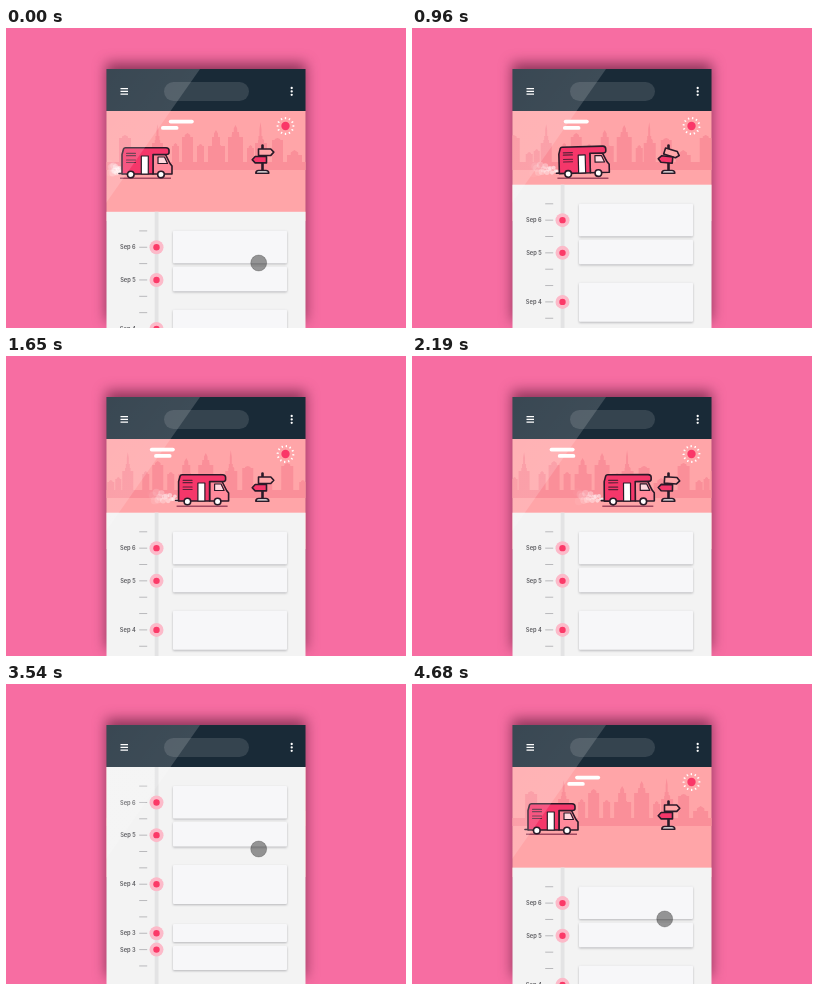
An HTML page that plays this animation: 400 by 300 pixels, repeating every 4.71 s.

```html
<!DOCTYPE html>
<html lang="en">
<head>
<meta charset="utf-8">
<title>Pull to refresh</title>
<style>
  html, body { margin: 0; width: 100%; height: 100%; overflow: hidden; background: #f76da2; }
  svg { display: block; width: 400px; height: 300px; }
  .shade { fill: #50142f; fill-opacity: .62; filter: blur(6.5px); }
  .card { fill: #f7f7f9; filter: drop-shadow(0 1px .9px rgba(40, 40, 50, .3)); }
  .label { font: 600 5.7px Inter, Roboto, sans-serif; fill: #5c5c60; text-anchor: end; }
  .line { stroke: #2a1a28; stroke-width: 1.6; stroke-linejoin: round; stroke-linecap: round; }
  .thin { stroke-width: 1.2; }
  .thick { stroke-width: 2.6; }
</style>
</head>
<body>
<svg viewBox="0 0 400 300">
  <defs>
    <clipPath id="screen"><rect x="100.5" y="41" width="199" height="259"/></clipPath>
    <linearGradient id="sheen" gradientUnits="userSpaceOnUse" x1="100" y1="41" x2="163" y2="85">
      <stop offset="0" stop-color="#fff" stop-opacity=".14"/>
      <stop offset="1" stop-color="#fff" stop-opacity=".16"/>
    </linearGradient>
  </defs>
  <rect width="400" height="300" fill="#f76da2"/>
  <rect class="shade" x="100" y="35" width="200" height="258"/>

  <g clip-path="url(#screen)">
    <rect x="100" y="83" width="200" height="110" fill="#ffa5a8"/>
    <path id="city" fill="#fa8f99"/>
    <g fill="#fff">
      <rect id="cloudA" y="91.7" width="25" height="3.8" rx="1.9"/>
      <rect id="cloudB" y="98" width="17.5" height="3.8" rx="1.9"/>
    </g>
    <circle cx="279.5" cy="98" r="4.2" fill="#fa3768"/>
    <g id="rays" fill="#fff"/>

    <path class="line thick" d="M256.5 117.5V143"/>
    <path class="line" d="M249.8 145.3q0-2.8 2.8-2.8h7.4q2.8 0 2.8 2.8z" fill="#fff"/>
    <path id="signA" class="line" d="M252.5 121h12.3l3 3.2-3 3.2h-12.3z" fill="#ffa7a9"/>
    <path id="signB" class="line" d="M260.5 128.5h-11.3l-3 3.2 3 3.2h11.3z" fill="#f5376a"/>

    <g id="smoke" fill="#fff"/>
    <path id="ground" d="M1 150.2H52" stroke="#a04860" stroke-width="1.5"/>
    <g id="van">
      <path d="M0 27H4" class="line"/>
      <path class="line" d="M34 8H46.500L51 17L53 19.500V27.500H34Z" fill="#ff8a9b"/>
      <path class="line" d="M3 27.500V8L4.500 2.500Q5 1.200 6.500 1.200H47Q50 1.200 50 4V6Q50 8 47.500 8H34V27.500Z" fill="#f5376a"/>
      <path class="line thin" d="M39 10.500H45.500L48.500 17H39Z" fill="#ffd9df"/>
      <path class="line thin" d="M7.500 6.800h9M7.500 9.200h9M7.500 13.500h9M7.500 16h9" stroke-opacity=".75"/>
      <rect class="line thin" x="22.300" y="9.500" width="7" height="18" fill="#fff"/>
      <g class="line" fill="#fff">
        <circle cx="11.800" cy="28" r="3.300"/>
        <circle cx="42" cy="28" r="3.300"/>
      </g>
    </g>

    <g id="sheet">
      <rect x="100" y="83" width="200" height="260" fill="#f3f3f3"/>
      <rect x="148.700" y="83" width="3.800" height="260" fill="#e3e3e4"/>
    </g>
    <g id="cards"/>

    <rect x="100" y="41" width="200" height="42" fill="#192a37"/>
    <path d="M100 41H194L100 175Z" fill="url(#sheen)"/>
    <rect x="158" y="54" width="85" height="19" rx="9.500" fill="#fff" fill-opacity=".12"/>
    <path d="M114.500 60.600h7.500M114.500 63.400h7.500M114.500 66.200h7.500" stroke="#fff" stroke-width="1.200"/>
    <g fill="#fff">
      <circle cx="285.700" cy="60" r="1.150"/>
      <circle cx="285.700" cy="63.400" r="1.150"/>
      <circle cx="285.700" cy="66.800" r="1.150"/>
    </g>
  </g>
  <circle id="finger" cx="252.700" r="8" fill="#000" fill-opacity=".4" stroke="#000" stroke-opacity=".25" stroke-width=".8"/>
</svg>

<script>
const LOOP = 4710, PULLED = 100.8, OPEN = 73.7, PITCH = 16.35;
const $ = id => document.getElementById(id);
const set = (el, attrs) => { for (const k in attrs) el.setAttribute(k, attrs[k]); return el; };
const add = (parent, tag, attrs) =>
  parent.appendChild(set(document.createElementNS('http://www.w3.org/2000/svg', tag), attrs));

const clamp = u => Math.min(1, Math.max(0, u));
const smooth = u => u * u * (3 - 2 * u);
const cubic = u => u < .5 ? 4 * u ** 3 : 1 - 4 * (1 - u) ** 3;

// Skyline: blocks of [x, width, top, roof height], tiled sideways
const blocks = [
  [113, 12, 110, 3], [131, 7, 126, 2], [139, 6, 123, 2],
  [146, 11, 115, 6], [149.5, 4, 108, 12], [166, 7, 118, 3], [176, 11, 109, 4],
  [191, 7, 118, 2], [202, 17, 118, 2], [206, 8, 109, 7], [222, 15, 109, 5],
  [226, 7, 104, 7], [241, 7, 120, 3], [249, 12, 115, 6], [252.5, 4, 108, 14],
  [266, 11, 112, 2], [281, 15, 127, 5]
];
let skyline = 'M60 142V134H560V142Z';
for (const shift of [0, 192]) {
  for (const [x, w, top, roof] of blocks) {
    const q = w / 4, r = roof / 2;
    skyline += `M${x + shift} 142V${top}h${q}v${-r}l${q} ${-r}l${q} ${r}v${r}h${q}V142Z`;
  }
}
set($('city'), { d: skyline });

for (let i = 0; i < 12; i++) {
  add($('rays'), 'rect', {
    x: 278.8, y: 89, width: 1.4, height: 2.2, rx: .6, transform: `rotate(${i * 30} 279.5 98)`
  });
}

const days = { 1: 'Sep 6', 3: 'Sep 5', 6: 'Sep 4', 9: 'Sep 3', 10: 'Sep 3' };
for (let i = 0; i < 12; i++) {
  const y = 102.1 + i * PITCH;
  add($('sheet'), 'rect', { x: 133.2, y: y - .5, width: 8, height: 1, fill: '#b9b9bc' });
  if (!days[i]) continue;
  add($('sheet'), 'circle', { cx: 150.5, cy: y, r: 7, fill: '#fcbac9' });
  add($('sheet'), 'circle', { cx: 150.5, cy: y, r: 3.2, fill: '#fb3a68' });
  add($('sheet'), 'text', { x: 129.7, y: y + 2.1, class: 'label' }).textContent = days[i];
}

const cards = [[102, 32.5], [138, 24.5], [181, 39], [240, 18], [262, 24]].map(([y, height]) =>
  add($('cards'), 'rect', { x: 167, y, width: 114, height, rx: 1, class: 'card' }));
const puffs = Array.from({ length: 16 }, () => add($('smoke'), 'circle', {}));

// Pull progress: a larger lag starts later, all end together
const pull = (t, lag) => smooth(clamp((t - 3540) / 1150) ** lag);
const pullLag = [3.3, 2.52, 2.28, 2.15, 2.07];

// Vertical offset of the sheet (i = -1) or of card i
function offset(t, i) {
  if (t > 3300) return PULLED * pull(t, i < 0 ? 2.96 : pullLag[i]);
  if (t < 2400) return PULLED + (OPEN - PULLED) * smooth(clamp((t - 30 - 20 * (i + 1)) / 520));
  const start = i < 0 ? 2456 : 2505 + 33 * i;
  return OPEN * (1 - cubic(clamp((t - start) / 270)));
}

const move = (el, x, y, extra = '') => set(el, { transform: `translate(${x} ${y}) ${extra}` });
const turn = (el, angle, x, y) => set(el, { transform: `rotate(${angle} ${x} ${y})` });

function draw(t) {
  const s = t > 3300 ? t - LOOP : t;   // scenery clock, runs on through the loop point
  const drive = Math.max(0, s);

  move($('sheet'), 0, offset(t, -1));
  cards.forEach((card, i) => move(card, 0, offset(t, i)));

  move($('city'), s < 0 ? -.005 * s : -.018 * s, 0);
  set($('cloudA'), { x: 162.8 - .0115 * s });
  set($('cloudB'), { x: 155 - (s < 0 ? .0085 : .0042) * s });
  turn($('rays'), s * .04, 279.5, 98);

  const sway = -Math.sin(drive / 1100 * 6 * Math.PI);
  turn($('signA'), sway * 25, 256.5, 124);
  turn($('signB'), sway * 8, 256.5, 132);

  const x = 113 + .0365 * Math.max(0, drive - 100);
  move($('van'), x, 118.5 - Math.min(1, drive / 300), `rotate(${sway * -2.2} 26 30)`);
  move($('ground'), x, 0);

  const trail = Math.min(27, 12 + drive * .018);
  puffs.forEach((puff, i) => {
    const age = (drive / 620 + i / puffs.length) % 1;
    set(puff, {
      cx: x + 2 - trail * age,
      cy: 142.5 - 2 * age + 5 * Math.sin(i * 2.4) * (.4 + .6 * age),
      r: 1.5 + 2.8 * age,
      opacity: s < 0 ? 0 : .65 * (1 - age)
    });
  });

  set($('finger'), {
    cy: t < 3300 ? 235 : 165 + 70 * pull(t, 1.79),
    opacity: t < 3300 ? 1 - clamp((t - 20) / 260) : t >= 3535 ? 1 : 0
  });
}

function tick() {
  draw(performance.now() % LOOP);
  requestAnimationFrame(tick);
}
tick();
</script>
</body>
</html>
```
